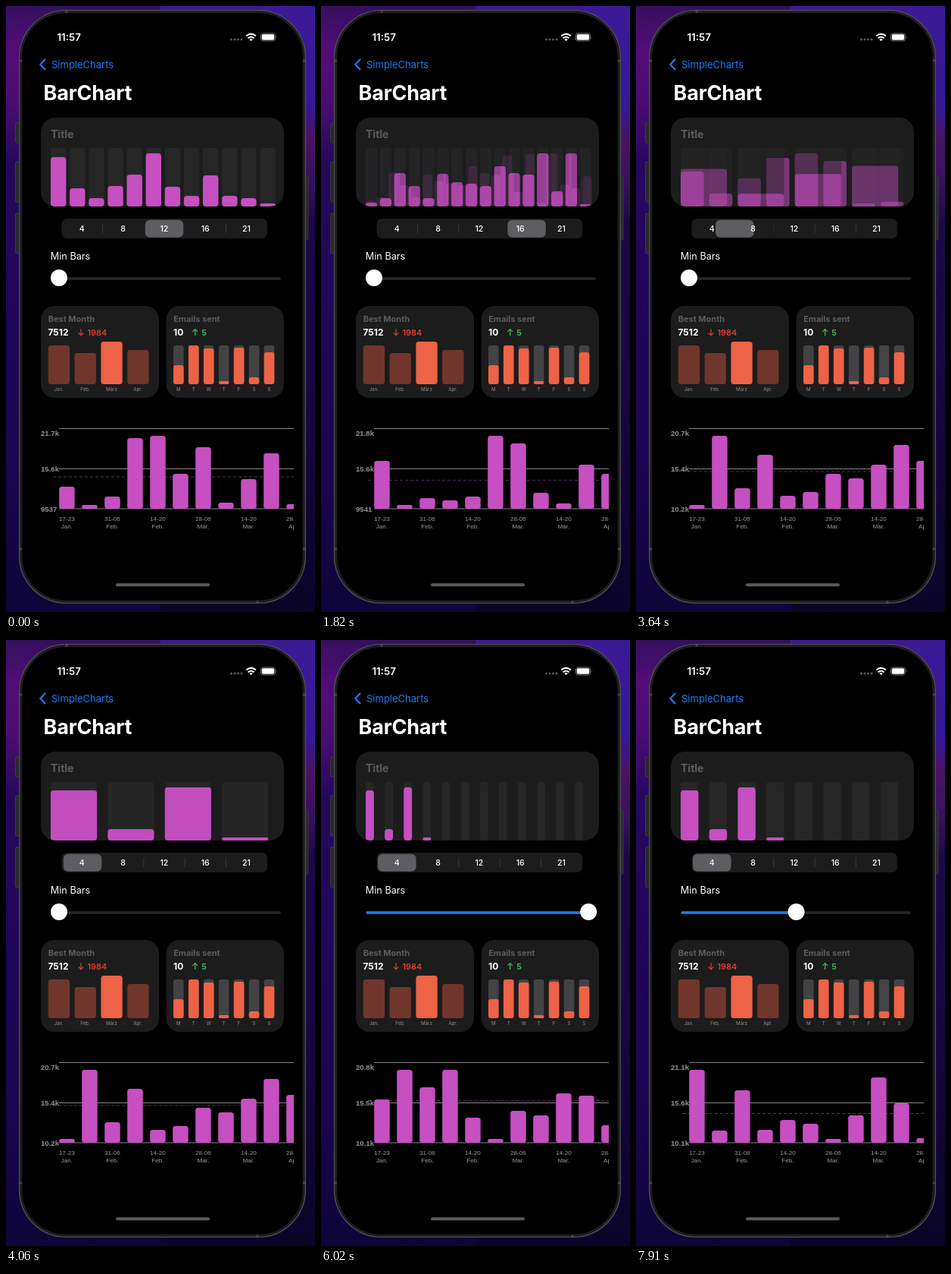
Write an HTML page that moves like this. It is 408x798 px and loops after 8000 ms.

```html
<!DOCTYPE html>
<html lang="en">
<head>
<meta charset="utf-8">
<title>BarChart</title>
<style>
  html, body { margin: 0; width: 100%; height: 100%; overflow: hidden; background: #0d0530; }
  svg { display: block; width: 408px; height: 798px; }
  text { font-family: Inter, "Liberation Sans", sans-serif; fill: #fff; }
  .head { font-weight: 700; fill: #5d5d60; }
  .num { font-weight: 700; font-size: 12px; }
  .mid { text-anchor: middle; }
  .tiny { font-size: 6.2px; fill: #929295; text-anchor: middle; }
  .axis { font: 700 9.6px "Liberation Sans", Arial, sans-serif; fill: #929295; }
  .date { font: 8.1px "Liberation Sans", Arial, sans-serif; fill: #9c9c9f; text-anchor: middle; }
  .card { fill: #1c1c1d; }
  .track { fill: #262627; }
  .bar { fill: #c64fc1; }
  .grid { stroke: #858587; }
  .button { fill: #28282a; stroke: #454547; stroke-width: .7; }
</style>
</head>
<body>
<svg viewBox="0 0 408 798">
  <defs>
    <linearGradient id="wallLeft" x2="0" y2="1">
      <stop offset="0" stop-color="#35105f"/>
      <stop offset=".07" stop-color="#520d78"/>
      <stop offset=".16" stop-color="#4a0d72"/>
      <stop offset=".26" stop-color="#25085e"/>
      <stop offset=".5" stop-color="#200758"/>
      <stop offset=".8" stop-color="#19064e"/>
      <stop offset="1" stop-color="#0d0538"/>
    </linearGradient>
    <linearGradient id="wallRight" x2="0" y2="1">
      <stop offset="0" stop-color="#3c1a96"/>
      <stop offset=".16" stop-color="#35189a"/>
      <stop offset=".22" stop-color="#4b1263"/>
      <stop offset=".29" stop-color="#3a1060"/>
      <stop offset=".36" stop-color="#1a0848"/>
      <stop offset=".7" stop-color="#150640"/>
      <stop offset="1" stop-color="#0a0428"/>
    </linearGradient>
    <clipPath id="cardClip"><rect x="46" y="147" width="321" height="117" rx="19"/></clipPath>
    <clipPath id="plotClip"><rect x="40" y="550" width="340" height="145"/></clipPath>
  </defs>

  <!-- wallpaper and phone -->
  <rect width="204" height="798" fill="url(#wallLeft)"/>
  <rect x="204" width="204" height="798" fill="url(#wallRight)"/>
  <g class="button">
    <rect x="12.5" y="154" width="7" height="26" rx="1.5"/>
    <rect x="12.5" y="205" width="7" height="53" rx="1.5"/>
    <rect x="12.5" y="273" width="7" height="53" rx="1.5"/>
    <rect x="392" y="224" width="7" height="84" rx="1.5"/>
  </g>
  <rect x="17.7" y="5.7" width="377.6" height="780.6" rx="62" fill="#151516" stroke="#4a4a4d" stroke-width="1.6"/>
  <rect x="20.5" y="8.5" width="372" height="775" rx="59" fill="#000" stroke="#232325" stroke-width="1.4"/>
  <path d="M17 72h4M392 72h4M17 715h4M392 715h4M80 5v4M332 783v4" stroke="#5b5b5e" stroke-width="3" opacity=".6"/>

  <!-- status bar -->
  <text x="67.5" y="45.7" font-size="13.3" font-weight="600">11:57</text>
  <g fill="#5a5a5c">
    <circle cx="297.5" cy="44" r="1.5"/><circle cx="302" cy="44" r="1.5"/>
    <circle cx="306.5" cy="44" r="1.5"/><circle cx="311" cy="44" r="1.5"/>
  </g>
  <g fill="none" stroke="#fff" stroke-width="2">
    <path d="M317.3 39.6q6.3-5.4 12.6 0M319.6 42.4q4-3.2 8 0"/>
  </g>
  <path d="M321.3 43.9q2.3-1.8 4.6 0l-2.3 2.3z" fill="#fff"/>
  <rect x="336.5" y="36" width="19" height="10" rx="3" fill="none" stroke="#777"/>
  <rect x="337.8" y="37.3" width="16.4" height="7.4" rx="1.8" fill="#fff"/>
  <path d="M357 39.5q1.6 1.5 0 3z" fill="#777"/>

  <!-- navigation -->
  <path d="M51.5 70.5l-6.2 6.5l6.2 6.5" fill="none" stroke="#1a7cf5" stroke-width="2.2" stroke-linecap="round" stroke-linejoin="round"/>
  <text x="60" y="81.8" font-size="13" style="fill:#1a7cf5">SimpleCharts</text>
  <text x="49.5" y="123.5" font-size="27" font-weight="700" letter-spacing="-.2">BarChart</text>

  <!-- main card -->
  <rect class="card" x="46" y="147" width="321" height="117" rx="19"/>
  <text class="head" x="59" y="174" font-size="14">Title</text>
  <g id="top" clip-path="url(#cardClip)"></g>

  <!-- segmented control -->
  <rect class="card" x="73.5" y="280" width="271.5" height="26" rx="7"/>
  <rect id="pill" y="281.7" width="50.5" height="23" rx="6" fill="#5d5d62"/>
  <g id="segments"></g>

  <!-- slider -->
  <text x="58.8" y="334" font-size="12.7">Min Bars</text>
  <rect x="59.5" y="357.3" width="303.5" height="3.4" rx="1.7" fill="#272729"/>
  <rect id="fill" x="59.5" y="357.3" height="3.4" rx="1.7" fill="#1a7cf5"/>
  <circle id="thumb" cy="358" r="11" fill="#fff"/>

  <!-- small cards -->
  <rect class="card" x="46" y="395" width="156" height="121" rx="18"/>
  <text class="head" x="55.7" y="415.6" font-size="11">Best Month</text>
  <text class="num" x="55.5" y="434">7512</text>
  <path d="M99 425.3v8.4M95.7 430.4l3.3 3.3l3.3-3.3" fill="none" stroke="#e0402f" stroke-width="1.2"/>
  <text x="107.5" y="433.6" font-size="10.8" font-weight="600" style="fill:#e0402f">1984</text>
  <g id="months"></g>
  <rect class="card" x="211.5" y="395" width="155.5" height="121" rx="18"/>
  <text class="head" x="221.2" y="415.6" font-size="11">Emails sent</text>
  <text class="num" x="221" y="434">10</text>
  <path d="M249.7 433.9v-8.4M246.4 428.8l3.3-3.3l3.3 3.3" fill="none" stroke="#3fc15a" stroke-width="1.2"/>
  <text x="258.3" y="433.6" font-size="10.8" font-weight="600" style="fill:#3fc15a">5</text>
  <g id="days"></g>

  <!-- scrolling chart -->
  <path class="grid" d="M70 556.5h310M70 609.5h310M70 662h310"/>
  <path id="mean" d="M62 0h318" stroke-dasharray="4 3"/>
  <g clip-path="url(#plotClip)">
    <g id="plot"></g>
    <g id="dates"></g>
  </g>
  <g id="axis"></g>
  <rect x="145" y="760.3" width="124" height="4" rx="2" fill="#5b5b5d"/>
</svg>

<script>
const LOOP = 8000;
const $ = id => document.getElementById(id);
const rect = (cls, x, y, w, h, r, extra = '') =>
  `<rect class="${cls}" x="${x}" y="${y}" width="${w}" height="${h}" rx="${Math.min(r, h / 2)}" ${extra}/>`;
const label = (cls, x, y, s) => `<text class="${cls}" x="${x}" y="${y}">${s}</text>`;
const clamp = x => Math.max(0, Math.min(1, x));
const mix = (a, b, p) => a + (b - a) * p;

// Critically damped spring for selection, ease in-out for bar heights.
const spring = ms => { const w = Math.max(0, ms) * .0114; return 1 - (1 + w) * Math.exp(-w); };
const ease = ms => { const x = clamp(ms / 500); return x * x * (3 - 2 * x); };

// Selected segment, start time and bar heights.
const picks = [
  { at: -2000, seg: 2, h: [65, 24, 11, 27, 42, 70, 26, 14, 41, 14, 11, 4] },
  { at: 1062, seg: 3, h: [5, 11, 44, 27, 11, 43, 32, 30, 27, 53, 44, 42, 70, 20, 70, 3] },
  { at: 1759, seg: 4, h: [64, 35, 64, 55, 45, 22, 67, 46, 45, 54, 48, 30, 6, 4, 66, 36, 70, 29, 24, 40] },
  { at: 2644, seg: 1, h: [46, 17, 37, 64, 70, 60, 4, 6] },
  { at: 3507, seg: 0, h: [66, 15, 70, 4] }
];

// Data sets of the lower chart: axis labels, mean line and bar heights.
const PURPLE = '#5a2360', GREY = '#48484a';
const sets = [
  { at: -2000, axis: ['21.7k', '15.6k', '9537'], mean: 620, ink: GREY, h: [29, 5, 16, 93, 96, 46, 81, 8, 39, 73, 6] },
  { at: 470, axis: ['21.8k', '15.6k', '9541'], mean: 624.5, ink: PURPLE, h: [63, 5, 14, 11, 16, 96, 86, 21, 7, 58, 46] },
  { at: 2605, axis: ['20.7k', '15.4k', '10.2k'], mean: 613, ink: PURPLE, h: [5, 96, 27, 71, 17, 22, 46, 40, 58, 84, 63] },
  { at: 4705, axis: ['20.8k', '15.5k', '10.1k'], mean: 606.5, ink: PURPLE, h: [57, 96, 73, 96, 33, 5, 42, 36, 65, 62, 23] },
  { at: 6805, axis: ['21.1k', '15.6k', '10.1k'], mean: 623.5, ink: GREY, h: [96, 16, 69, 17, 30, 25, 5, 36, 86, 52, 6] }
];

// Slider steps: each time raises or lowers the value by one.
const stepsUp = [4760, 4900, 5040, 5180, 5320, 5530, 5740, 5950];
const stepsDown = [6160, 6440, 6650, 6860];
const passed = (list, t) => list.filter(at => at <= t).length;

const current = (list, t) => {
  const i = passed(list.map(s => s.at), t) - 1;
  return [list[Math.max(0, i - 1)], list[i]];
};
const heights = (from, to, p) => to.h.map((h, i) => mix(from.h[i] ?? h, h, p));

function columns(h, min, opacity) {
  const n = Math.max(h.length, min), pitch = 301.5 / n, w = pitch - 57 / h.length;
  let out = '';
  for (let i = 0; i < n; i++) {
    const x = 59 + i * pitch;
    out += rect('track', x, 187, w, 77, 4);
    if (i < h.length) out += rect('bar', x, 264 - h[i], w, h[i], 4);
  }
  return `<g opacity="${opacity}">${out}</g>`;
}

const segX = i => 100.3 + i * 54.3;
const near = (gap, seg) => gap === seg || gap + 1 === seg ? 0 : 1;

function drawStatic() {
  $('segments').innerHTML = [0, 1, 2, 3].map(i =>
    `<rect class="gap" x="${segX(i) + 26.7}" y="286.5" width="1" height="13" fill="#39393b"/>`).join('') +
    [4, 8, 12, 16, 21].map((n, i) =>
      `<text class="mid" x="${segX(i)}" y="297" font-size="10.6" font-weight="500">${n}</text>`).join('');

  const tops = [447, 457, 442, 453];
  $('months').innerHTML = ['Jan.', 'Feb.', 'März', 'Apr.'].map((m, i) => {
    const x = 55.8 + i * 34.8;
    return rect('', x, tops[i], 28.3, 498 - tops[i], 3.5, `fill="${i === 2 ? '#ee6245' : '#70362b'}"`) +
      label('tiny', x + 14, 507.3, m);
  }).join('');

  const sent = [25, 51, 47, 4, 48, 9, 42];
  $('days').innerHTML = [...'MTWTFSS'].map((d, i) => {
    const x = 221 + i * 19.95;
    return rect('', x, 447, 13.6, 51, 3, 'fill="#434345"') +
      rect('', x, 498 - sent[i], 13.6, sent[i], 3, 'fill="#ee6245"') +
      label('tiny', x + 6.8, 507.3, d);
  }).join('');

  const weeks = ['17-23 Jan.', '31-06 Feb.', '14-20 Feb.', '28-06 Mar.', '14-20 Mar.', '28-03 Apr.'];
  $('dates').innerHTML = weeks.map((s, i) => s.split(' ').map((part, row) =>
    label('date', 80.3 + i * 60, 678 + row * 9.8, part)).join('')).join('');
}

function draw(t) {
  const value = 4 + passed(stepsUp, t) - passed(stepsDown, t);
  const thumb = 70 + (value - 4) * 35.4;
  $('thumb').setAttribute('cx', thumb);
  $('fill').setAttribute('width', value > 4 ? thumb - 59.5 : 0);

  const [was, now] = current(picks, t);
  const age = t - now.at, p = spring(age);
  $('top').innerHTML = (p < .995 ? columns(was.h, 4, 1 - p) : '') +
    columns(heights(was, now, ease(age)), value, p < .995 ? p : 1);
  $('pill').setAttribute('x', mix(segX(was.seg), segX(now.seg), p) - 25.2);
  document.querySelectorAll('.gap').forEach((g, i) =>
    g.setAttribute('opacity', mix(near(i, was.seg), near(i, now.seg), p)));

  const [before, set] = current(sets, t);
  $('plot').innerHTML = heights(before, set, ease(t - set.at))
    .map((h, i) => rect('bar', 70.2 + i * 30, 662 - h, 20.5, h, 3.5)).join('');
  $('axis').innerHTML = set.axis.map((s, i) => label('axis', 46, [566, 613, 665.5][i], s)).join('');
  $('mean').setAttribute('transform', `translate(0 ${set.mean})`);
  $('mean').setAttribute('stroke', set.ink);
}

let start;
function frame(now) {
  start ??= now;
  draw((now - start) % LOOP);
  requestAnimationFrame(frame);
}
drawStatic();
draw(0);
requestAnimationFrame(frame);
</script>
</body>
</html>
```
